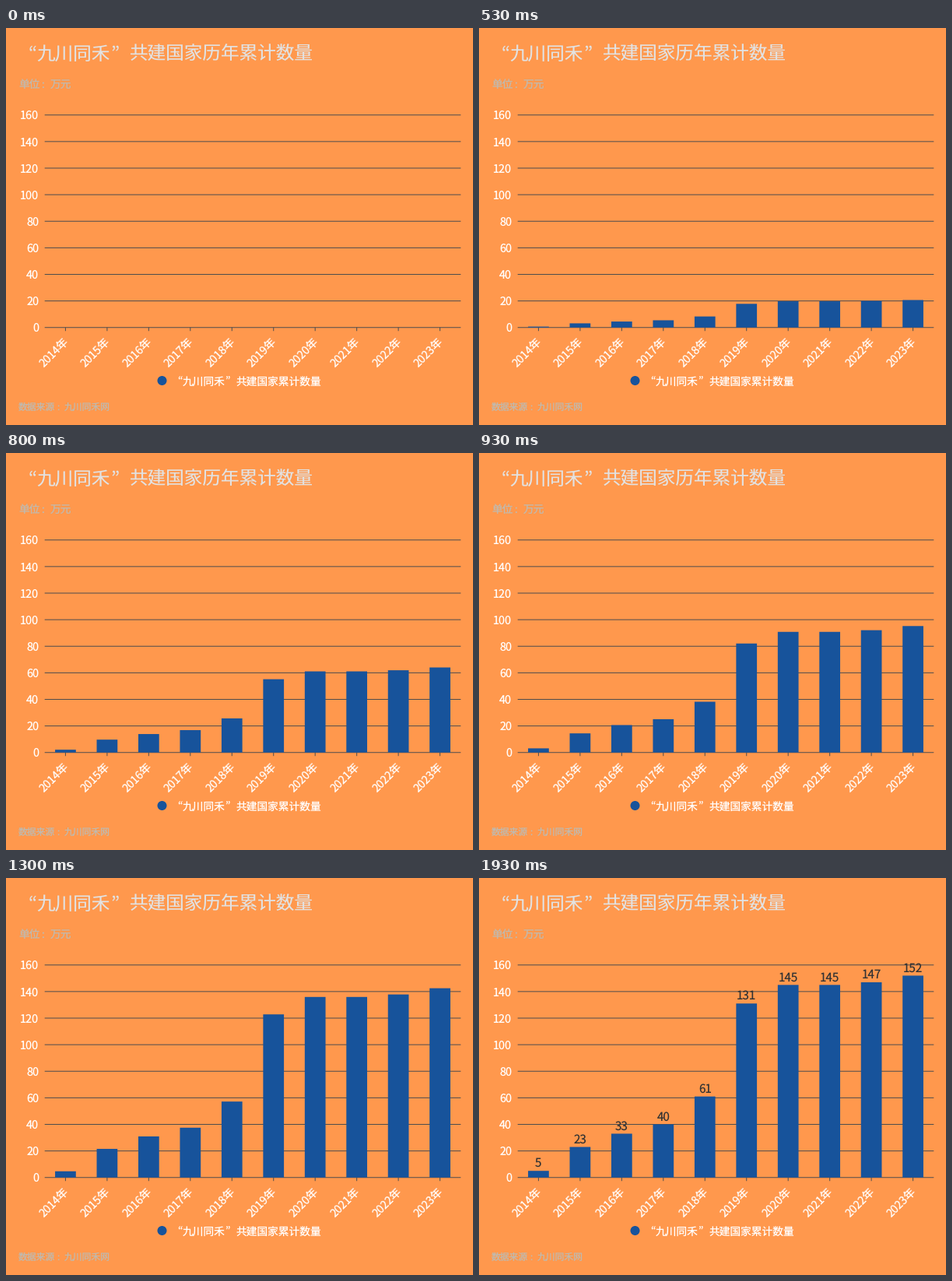
Animation of 600x510 px, one loop 3010 ms. Source, as a matplotlib script:

```python
import matplotlib.pyplot as plt
from matplotlib.animation import FuncAnimation
from matplotlib.patches import Circle, Rectangle

W, H, DPI = 600, 510, 120
LOOP, STEP = 3010, 10
PT = 72 / DPI                      # points per pixel

BACK, BLUE, LINE = "#ff984d", "#17539b", "#4d4d4d"
TITLE, MUTED, DARK = "#e2e2e2", "#bfbab0", "#333333"

VALUES = [5, 23, 33, 40, 61, 131, 145, 145, 147, 152]
LEFT, RIGHT, BASE, TOP = 49.7, 584.3, 384.75, 111.75
UNIT = (BASE - TOP) / 160
SLOT = (RIGHT - LEFT) / len(VALUES)
BAR = SLOT / 2

GROW_START, GROW_TIME = -50, 1800
FADE_START, FADE_TIME = 1750, 183

plt.rcParams["font.family"] = "Noto Sans CJK JP"
plt.rcParams["text.hinting"] = "none"

fig = plt.figure(figsize=(W / DPI, H / DPI), dpi=DPI, facecolor=BACK)
ax = fig.add_axes([0, 0, 1, 1])
ax.set_xlim(0, W)
ax.set_ylim(H, 0)
ax.axis("off")


def text(x, y, s, size, color, **kw):
    kw = {"ha": "left", "va": "baseline", **kw}
    return ax.text(x, y, s, fontsize=size * PT, color=color, **kw)


def line(x0, y0, x1, y1):
    ax.plot([x0, x1], [y0, y1], color=LINE, lw=PT, solid_capstyle="butt",
            snap=False, zorder=1)


def labelled(x, y, head, tail, size):
    """Two words with a left-set colon in a full-width cell between them."""
    text(x, y, head, size, MUTED)
    text(x + (len(head) + 0.15) * size, y, ":", size, MUTED)
    text(x + (len(head) + 1) * size, y, tail, size, MUTED)


def quoted(x, y, name, rest, size, color):
    """A name in quotes, each quote mark in a full-width cell, then the rest."""
    end = x + (len(name) + 1) * size
    text(x + size, y, "“", size, color, ha="right")
    text(x + size, y, name, size, color)
    text(end, y, "”", size, color)
    text(end + size, y, rest, size, color)


def ease(p):
    p = min(max(p, 0), 1)
    return 4 * p ** 3 if p < 0.5 else 1 - 4 * (1 - p) ** 3


quoted(16, 41, "九川同禾", "共建国家历年累计数量", 23.6, TITLE)
labelled(16, 77, "单位", "万元", 13.7)
labelled(16, 490.5, "数据来源", "九川同禾网", 11.8)

for v in range(0, 161, 20):
    y = BASE - v * UNIT
    line(LEFT, y, RIGHT, y)
    text(42.3, y + 5.5, str(v), 14.5, "white", ha="right")

bars, labels = [], []
for i, v in enumerate(VALUES):
    cx = LEFT + SLOT * (i + 0.5)
    line(cx, BASE, cx, BASE + 4.5)
    text(cx - 14.4, 416.5, f"{2014 + i}年", 14.3, "white",
         ha="center", va="center", rotation=45)
    bar = Rectangle((cx - BAR / 2, BASE), BAR, 0, fc=BLUE, lw=0, zorder=2, snap=False)
    bars.append(ax.add_patch(bar))
    labels.append(text(cx, BASE - v * UNIT - 5, str(v), 15.2, DARK,
                       ha="center", zorder=4))

ax.add_patch(Circle((200.5, 453), 6, fc=BLUE, lw=0))
quoted(213, 458.5, "九川同禾", "共建国家累计数量", 13.7, "white")


def update(n):
    # the picture advances thirty times a second
    t = (3 * n * STEP + 10) // 100 * 100 / 3
    grow = ease((t - GROW_START) / GROW_TIME) if t > 40 else 0
    fade = min(max((t - FADE_START) / FADE_TIME, 0), 1) ** 2
    for bar, label, v in zip(bars, labels, VALUES):
        bar.set_height(-v * UNIT * grow)
        label.set_alpha(fade)
        label.set_visible(fade > 0.01)
    return bars + labels


anim = FuncAnimation(fig, update, frames=LOOP // STEP, interval=STEP,
                     repeat=True, repeat_delay=0)
plt.show()
```
